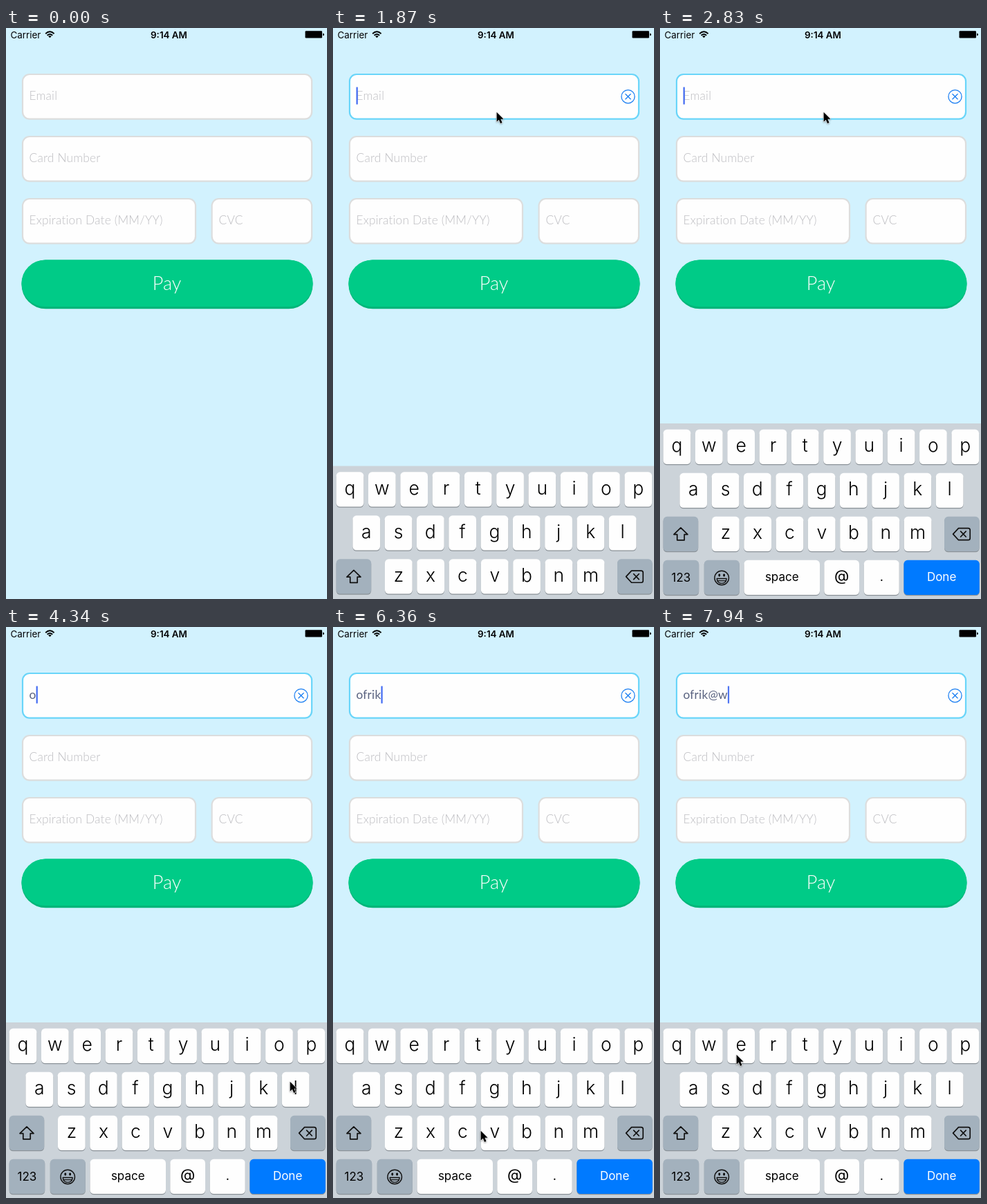
Recreate the animation shown at these times as an HTML page. Size 464 px wide and 826 px high, loop 7990 ms.

```html
<!DOCTYPE html>
<html lang="en">
<head>
<meta charset="utf-8">
<title>Payment form</title>
<style>
  html, body { margin: 0; width: 100%; height: 100%; overflow: hidden; background: #d2f2fe; }
  svg { display: block; width: 100%; height: 100%; }
  text { white-space: pre; }
  .form { font: 300 17.3px Lato, sans-serif; letter-spacing: .2px; fill: #bdbdc1; }
  .ui { font-family: Inter, sans-serif; fill: #000; }
  .mid { text-anchor: middle; }
  .line { fill: none; stroke: #111; stroke-width: 1.7; stroke-linejoin: round; stroke-linecap: round; }
</style>
</head>
<body>
<svg id="stage" viewBox="0 0 464 826">
  <rect width="464" height="826" fill="#d2f2fe"/>
  <g class="ui" font-size="13.4">
    <text x="6.5" y="14.6">Carrier</text>
    <text class="mid" x="235.5" y="14.6" font-weight="600">9:14 AM</text>
    <g fill="none" stroke="#000" stroke-width="1.9">
      <path d="M57.2 8.2Q63.4 2.3 69.6 8.2"/>
      <path d="M59.6 10.7Q63.4 7.1 67.2 10.7"/>
    </g>
    <path d="M63.4 14.3L61.1 12Q63.4 10 65.7 12Z"/>
    <rect x="432.5" y="4.3" width="24.5" height="10.2" rx="1.2"/>
    <path d="M458 7.5Q460 8 460 9.4T458 11.3Z"/>
  </g>

  <g fill="#fefefe" stroke="#dcdddd" stroke-width="2.2">
    <rect id="email" x="24" y="67" width="418" height="64.6" rx="10"/>
    <rect x="24" y="157" width="418" height="64.6" rx="10"/>
    <rect x="24" y="247" width="250" height="64.6" rx="10"/>
    <rect x="297.6" y="247" width="144.4" height="64.6" rx="10"/>
  </g>
  <g class="form">
    <text id="hint" x="33.5" y="104">Email</text>
    <text x="33.5" y="194">Card Number</text>
    <text x="33.5" y="284">Expiration Date (MM/YY)</text>
    <text x="307.5" y="284">CVC</text>
    <text id="typed" x="33.5" y="104" font-weight="400" style="fill:#5a6380;font-weight:400"></text>
  </g>
  <g id="active">
    <rect id="caret" y="85.5" width="2.2" height="25" fill="#426bf2"/>
    <g fill="none" stroke="#1a7ef2" stroke-width="1.3">
      <circle cx="426.5" cy="99.2" r="9.6"/>
      <path d="M422.5 95.2l8 8m0-8l-8 8"/>
    </g>
  </g>

  <rect x="22.5" y="335.5" width="421" height="70.8" rx="35" fill="#00b679"/>
  <rect x="22.5" y="335.5" width="421" height="67.6" rx="33.8" fill="#00cb87"/>
  <text class="mid" x="232.5" y="378.5" fill="#fff" style="font:300 27px Lato,sans-serif">Pay</text>

  <g id="board" class="ui">
    <rect y="572" width="464" height="256" fill="#ccd3d9"/>
    <g id="keys"></g>
    <path class="line" d="M30 722.8L40 732.6H35.2V740.8H24.8V732.6H20Z"/>
    <path class="line" d="M431.5 723.6H445.5Q448.2 723.6 448.2 726.3V738Q448.2 740.7 445.5 740.7H431.5L423.6 732.1Z"/>
    <path class="line" stroke-width="1.4" d="M434.6 728.2l7.6 7.8m0-7.8l-7.6 7.8"/>
    <g class="line" style="stroke-width:1.4">
      <circle cx="89.2" cy="795.5" r="10.3"/>
      <path d="M82.2 796.5H96.2Q95.6 803.4 89.2 803.4T82.2 796.5ZM83.4 799.6H95"/>
    </g>
    <ellipse cx="85.8" cy="791.6" rx="1.4" ry="2.1"/>
    <ellipse cx="92.6" cy="791.6" rx="1.4" ry="2.1"/>
    <g id="pop">
      <path fill="#fdfdfd" style="filter:drop-shadow(0 1px 2px rgba(0,0,0,.35))"/>
      <text class="mid" font-size="40" font-weight="300"></text>
    </g>
  </g>
  <path id="arrow" d="M.6 .8V14.8L3.8 11.8L6 17L8.6 15.9L6.4 10.8H10.6Z" fill="#000" stroke="#fff"
    stroke-width="1.1" stroke-linejoin="round" paint-order="stroke" style="filter:drop-shadow(0 1px 1px rgba(0,0,0,.35))"/>
</svg>
<script>
const LOOP = 7990, FOCUS = 1712, KEY_H = 50.2;
const NAME = 'ofrik@w';
const $ = id => document.getElementById(id);
const clamp = v => Math.max(0, Math.min(1, v));

// Keyboard rows
const rowY = r => 580.8 + 63 * r;
const letters = (str, x) => [...str].map((label, i) => ({ label, x: x + 46.3 * i, w: 39.7, size: 26.5 }));
const key = (label, x, w, size = 17, fill = '#fefefe', ink = '#000') => ({ label, x, w, size, fill, ink });
const GREY = '#a3b1bd';
const rows = [
  letters('qwertyuiop', 4.7),
  letters('asdfghjkl', 28.4),
  [...letters('zxcvbnm', 75), key('', 4.7, 50.5, 17, GREY), key('', 411, 50.5, 17, GREY)],
  [key('123', 4.7, 51.5, 17, GREY), key('', 63.8, 51, 17, GREY), key('space', 121.5, 109.5),
   key('@', 237.3, 50.7, 22), key('.', 294.8, 50.9, 18), key('Done', 352.4, 109.4, 17, '#007aff', '#fff')]
];
$('keys').innerHTML = rows.map((row, r) => row.map(k => {
  const y = rowY(r), big = k.size > 25;
  const box = (dy, fill) => `<rect x="${k.x}" y="${y + dy}" width="${k.w}" height="${KEY_H}" rx="5.5" fill="${fill}"/>`;
  return box(1.3, '#8b9298') + box(0, k.fill || '#fefefe') +
    `<text class="mid" x="${k.x + k.w / 2}" y="${y + (big ? 32.2 : r == 3 && k.label == '123' ? 31.5 : 30)}" ` +
    `font-size="${k.size}" font-weight="${big ? 300 : 400}" style="fill:${k.ink || '#000'}">${k.label}</text>`;
}).join('')).join('');

// Key presses: down, up, row, column
const presses = [
  [4050, 4150, 0, 2], [4580, 4670, 1, 8], [5030, 5125, 2, 3], [5620, 5710, 0, 7],
  [5950, 6040, 1, 1], [6760, 6860, 3, 3], [7360, 7432, 2, 6]
];

// Pointer stops: time, x, y
const stops = [
  [1115, 472, 194], [1340, 229, 124], [1420, 236, 121], [3400, 236, 121], [3740, 122, 633],
  [3880, 113, 622], [4130, 113, 622], [4335, 410, 657], [4660, 410, 657], [4960, 228, 734],
  [5100, 228, 734], [5265, 363, 608], [5370, 363, 608], [5440, 341, 608], [5690, 341, 608],
  [5920, 92, 668], [6030, 92, 668], [6250, 198, 733], [6350, 213, 728], [6420, 213, 728],
  [6690, 258, 797], [6850, 258, 797], [7235, 357, 742], [7440, 357, 742], [7935, 110, 618]
];

function pointerAt(t) {
  const i = stops.findIndex(s => s[0] > t);
  if (i < 0) return stops[stops.length - 1].slice(1);
  if (i == 0) return null;
  const [t0, x0, y0] = stops[i - 1], [t1, x1, y1] = stops[i];
  const u = (t - t0) / (t1 - t0), e = u * u * (3 - 2 * u);
  return [x0 + (x1 - x0) * e, y0 + (y1 - y0) * e];
}

function caretAlpha(idle) {
  if (idle < 500) return 1;
  const p = (idle - 500) % 1000;
  return p < 490 ? 1 - clamp(p / 130) : clamp((p - 490) / 125);
}

function popPath(k, y) {
  const l = k.x - 19, r = k.x + k.w + 18.7, a = k.x, b = k.x + k.w, top = y - 66, bot = y + KEY_H;
  return `M${l + 11} ${top}H${r - 11}Q${r} ${top} ${r} ${top + 11}V${y - 20}` +
    `C${r} ${y - 5} ${b} ${y - 6} ${b} ${y + 11}V${bot - 5}Q${b} ${bot} ${b - 5} ${bot}` +
    `H${a + 5}Q${a} ${bot} ${a} ${bot - 5}V${y + 11}C${a} ${y - 6} ${l} ${y - 5} ${l} ${y - 20}` +
    `V${top + 11}Q${l} ${top} ${l + 11} ${top}Z`;
}

const show = (el, on) => el.setAttribute('visibility', on ? 'visible' : 'hidden');
const [popShape, popText] = $('pop').children;

function render(t) {
  const focused = t >= FOCUS;
  const done = presses.filter(p => p[1] <= t);
  $('email').setAttribute('stroke', focused ? '#69d5f9' : '#dcdddd');
  show($('active'), focused);
  show($('hint'), !done.length);

  const typed = $('typed');
  typed.textContent = NAME.slice(0, done.length);
  const width = done.length ? typed.getComputedTextLength() : 0;
  const last = done.length ? done[done.length - 1][1] : FOCUS;
  $('caret').setAttribute('x', 33.6 + width);
  $('caret').setAttribute('opacity', caretAlpha(t - last));

  // Critically damped slide
  const s = Math.max(0, t - FOCUS) * 0.0172;
  $('board').setAttribute('transform', `translate(0 ${254 * Math.exp(-s) * (1 + s)})`);

  const press = presses.find(p => p[0] <= t && t < p[1]);
  show($('pop'), press);
  if (press) {
    const k = rows[press[2]][press[3]], y = rowY(press[2]);
    popShape.setAttribute('d', popPath(k, y));
    popText.textContent = k.label;
    popText.setAttribute('x', k.x + k.w / 2);
    popText.setAttribute('y', y - 20);
  }

  const at = pointerAt(t);
  show($('arrow'), at);
  if (at) $('arrow').setAttribute('transform', `translate(${at})`);
}

const start = performance.now();
function tick() {
  render((performance.now() - start) % LOOP);
  requestAnimationFrame(tick);
}
tick();
</script>
</body>
</html>
```
